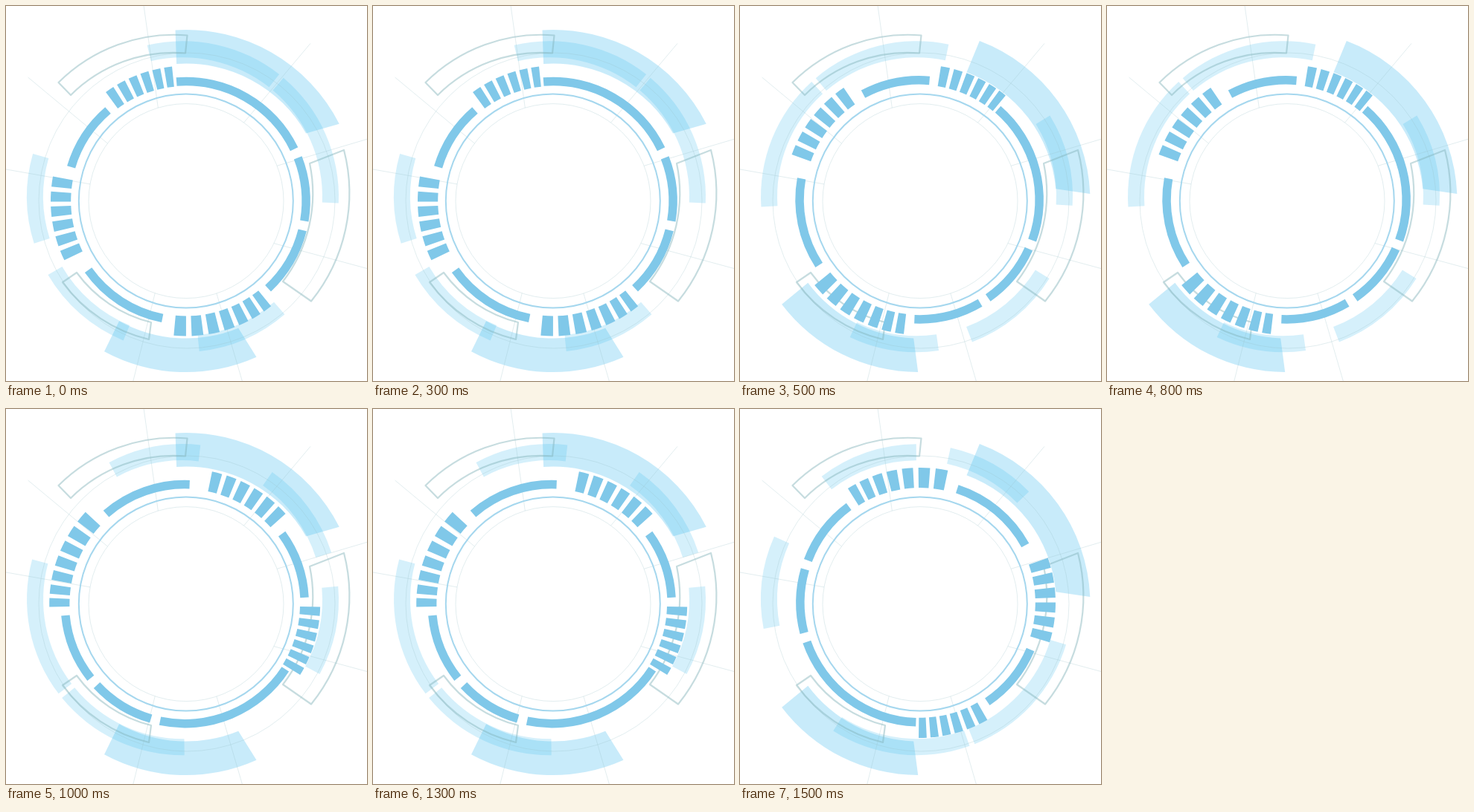
Recreate the animation shown at these times as an HTML page with a canvas. Size 485x505 px, loop 2000 ms.

```html
<!DOCTYPE html>
<html lang="en">
<head>
<meta charset="utf-8">
<title>Rotating dial</title>
<style>
html, body { margin: 0; width: 100%; height: 100%; overflow: hidden; background: #fff; }
canvas { display: block; }
</style>
</head>
<body>
<canvas id="stage" width="485" height="505"></canvas>
<script>
const ctx = document.getElementById('stage').getContext('2d');
const STEP = 500;
const CX = 242, CY = 262.6;
const BLUE = '#80c8e9';
const HAIRLINE = 'rgba(150, 190, 197, 0.28)';
const FAN_SWING = 24.4;
const rad = deg => deg * Math.PI / 180;

// Each pose holds still for one step; angles are clockwise degrees.
const poses = [
  { dial: 0, band: 0, shift: 0 },
  { dial: 45.5, band: -80.6, shift: -0.9 },
  { dial: 127.6, band: 192.6, shift: -1.8 },
  { dial: 186.6, band: 120, shift: 0 }
];

// [start, end]
const arcs = [[-94.6, -25.7], [-21.2, 9.6], [14.1, 46.9], [101.4, 144.7], [196.5, 229.3]];
const bands = [[-49.8, 2.4], [-103.2, -51.8], [49.2, 83.9], [112.4, 149.8], [162.5, 196]];

// growth widens the bars clockwise
const barGroups = [
  { from: -127.3, to: -95.2, count: 6, growth: -0.08 },
  { from: 50.3, to: 96.5, count: 7, growth: 0.19 },
  { from: 153, to: 191.5, count: 6, growth: 0 }
];

// [outer start, outer end, inner start, inner end]
const fans = [[-93.6, -26.8, -94, -29.5], [65.8, 118.5, 67.7, 119.1]];

// [inner angle, slant]
const spokes = [
  [25.8, -5.5], [71.8, 1], [108.6, -2.4], [190, 0],
  [216.3, 1.8], [253.3, 4.5], [306.3, 1.9], [338.8, 2.4]
];

const frames = [
  'M70.5 103A219.5 219.5 0 0 1 243.5 39.5L241 63.5A195.5 195.5 0 0 0 87 120Z',
  'M454 194A232 232 0 0 1 410 397.5L372 371A195 195 0 0 0 408 212Z',
  'M76 372A200 200 0 0 0 192 449L195 426A175 175 0 0 1 95 359Z'
].map(d => new Path2D(d));

function sector(x, y, inner, outer, from, to, innerFrom = from, innerTo = to) {
  ctx.beginPath();
  ctx.arc(x, y, outer, rad(from), rad(to));
  ctx.arc(x, y, inner, rad(innerTo), rad(innerFrom), true);
  ctx.closePath();
  ctx.fill();
}

function ring(x, y, r, color, width) {
  ctx.strokeStyle = color;
  ctx.lineWidth = width;
  ctx.beginPath();
  ctx.arc(x, y, r, 0, 2 * Math.PI);
  ctx.stroke();
}

function drawGlow(band, swing) {
  ctx.fillStyle = 'rgba(66, 187, 236, 0.29)';
  for (const fan of fans) {
    sector(CX - 2 * swing, CY, 185, 230.5, ...fan.map(a => a + FAN_SWING * swing));
  }
  ctx.fillStyle = 'rgba(66, 187, 236, 0.22)';
  for (const [from, to] of bands) sector(237.5, 256.7, 187.5, 209.5, from + band, to + band);
}

function drawLines() {
  ring(CX, CY, 131, HAIRLINE, 1);
  ring(243, 262, 199, HAIRLINE, 1);
  ctx.beginPath();
  for (const [angle, slant] of spokes) {
    for (const [r, a] of [[131, rad(angle)], [270, rad(angle + slant)]]) {
      const x = CX + r * Math.cos(a), y = CY + r * Math.sin(a);
      if (r === 131) ctx.moveTo(x, y);
      else ctx.lineTo(x, y);
    }
  }
  ctx.stroke();

  ctx.strokeStyle = 'rgba(130, 178, 184, 0.45)';
  ctx.lineWidth = 2.2;
  ctx.lineJoin = 'round';
  for (const frame of frames) ctx.stroke(frame);
  ring(CX - 0.2, CY, 144, '#a5d7ee', 2);
}

function drawBars({ from, to, count, growth }, x, y, turn) {
  const edge = t => from + (to - from) * (t + growth * t * (t - 1)) + turn;
  for (let i = 0; i < count; i++) {
    sector(x, y, 154.8, 182, edge((i + 0.16) / count), edge((i + 0.84) / count));
  }
}

function drawDial({ dial, shift }, swing) {
  const x = CX + shift, y = CY - 1.7 * swing;
  ctx.fillStyle = BLUE;
  for (const [from, to] of arcs) sector(x, y, 155.3, 166.8, from + dial, to + dial);
  for (const group of barGroups) drawBars(group, x, y, dial);
}

function draw(now) {
  const step = Math.floor(now / STEP) % poses.length;
  const pose = poses[step];
  const swing = step % 2;
  ctx.fillStyle = '#fff';
  ctx.fillRect(0, 0, 485, 505);
  drawGlow(pose.band, swing);
  drawLines();
  drawDial(pose, swing);
}

let start;
function tick(now) {
  start ??= now;
  draw(Math.max(0, now - start));
  requestAnimationFrame(tick);
}
draw(0);
requestAnimationFrame(tick);
</script>
</body>
</html>
```
